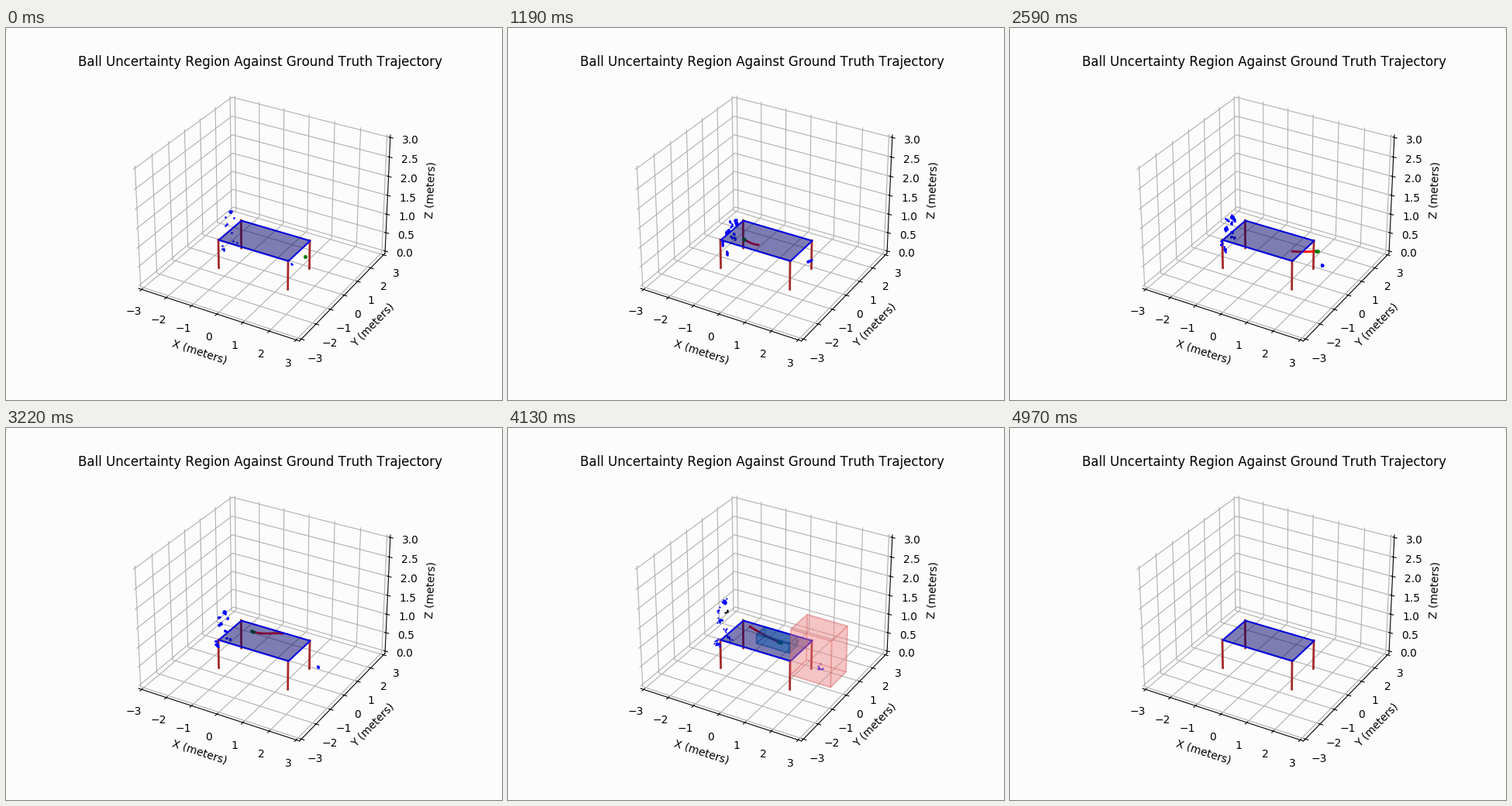
A matplotlib script that plays this animation: 640 by 480 pixels, repeating every 5.04 s.

```python
import itertools
import numpy as np
import matplotlib.pyplot as plt
from matplotlib.animation import FuncAnimation
from matplotlib.lines import Line2D
from matplotlib.transforms import Affine2D
from mpl_toolkits.mplot3d.art3d import Poly3DCollection

W, H = 640, 480
FRAMES, STEP = 72, 70
HIT = 51              # the stroke that starts the predicted regions
TAIL = 5              # samples of history kept on screen
PAPER = "#fcfcfc"

plt.rcParams["text.kerning_factor"] = 6
fig = plt.figure(figsize=(W / 100, H / 100), dpi=100, facecolor=PAPER)
ax = fig.add_subplot(projection="3d", facecolor=PAPER)
pixels = Affine2D().scale(1 / W, -1 / H).translate(0, 1) + fig.transFigure


def add_faces(faces, face, edge, width):
    poly = Poly3DCollection(faces, facecolors=[face], edgecolors=[edge],
                            linewidths=width)
    ax.add_collection3d(poly)
    return poly


def box_faces(lo, hi):
    """Six faces of an axis-aligned box."""
    faces = []
    for axis, side in itertools.product(range(3), (lo, hi)):
        a, b = [k for k in range(3) if k != axis]
        face = []
        for ca, cb in ((lo, lo), (hi, lo), (hi, hi), (lo, hi)):
            point = [0, 0, 0]
            point[axis], point[a], point[b] = side[axis], ca[a], cb[b]
            face.append(tuple(point))
        faces.append(face)
    return faces


def add_line(**style):
    line = Line2D([], [], transform=pixels, **style)
    ax.add_artist(line)
    return line


# Table with legs
LENGTH, WIDTH, HEIGHT = 2.74, 1.525, 0.76
corners = [(sx * LENGTH / 2, sy * WIDTH / 2)
           for sx, sy in ((-1, -1), (1, -1), (1, 1), (-1, 1))]
for x, y in corners:
    ax.plot([x, x], [y, y], [0, HEIGHT], color="brown", lw=2, zorder=1)
add_faces([[(x, y, HEIGHT) for x, y in corners]],
          (0, 0, 0.42, 0.5), (0, 0, 0.88, 1), 1.5)

UNIT = box_faces((0, 0, 0), (1, 1, 1))
reach_box = add_faces(UNIT, (0.94, 0.5, 0.5, 0.25), (0.83, 0.35, 0.35, 0.25), 1.2)
ball_box = add_faces(UNIT, (0, 0.7, 0.95, 0.24), (0, 0.38, 0.58, 0.3), 1.2)
trail = add_line(color="red", lw=2, zorder=2)
ball = add_line(color="green", ls="", marker="o", ms=3.4, mew=0, zorder=2.2)
dots = dict(ls="", marker="o", mew=0, zorder=2.1)
body, shade = add_line(color="blue", **dots), add_line(color="black", **dots)

# Strokes on screen: time, x, y
STROKES = [(0, 386, 295), (21, 292, 262), (37, 397, 288),
           (HIT, 288, 242), (70, 440, 303)]

# Player joints: x, y, shift when leaning forward, number of markers
JOINTS = [(288, 238, 10, 18, 5), (283, 244, 8, 8, 1), (283, 253, 2, 13, 3),
          (291, 264, 4, 3, 1), (295, 275, -3, -6, 2), (278, 283, 1, -4, 2),
          (281, 285, 6, 9, 2), (294, 245, -4, 14, 1)]
marks = np.random.default_rng(4)
OFFSETS = [marks.uniform(-2.5, 2.5, (j[4], 2)) if j[4] > 1 else np.zeros((1, 2))
           for j in JOINTS]


def ball_at(t):
    """Flights to the left rise and dip, flights to the right sag."""
    for (t0, x0, y0), (t1, x1, y1) in zip(STROKES, STROKES[1:]):
        if t <= t1:
            break
    u = (t - t0) / (t1 - t0)
    if x1 < x0:
        u += 0.4 * u * (1 - u)
        bend = -8 * np.sin(2 * np.pi * u)
    else:
        bend = 10 * np.sin(np.pi * u)
    return x0 + u * (x1 - x0), y0 + u * (y1 - y0) + bend


def joint_at(joint, t):
    x, y, dx, dy, _ = joint
    lean = np.sin(np.pi * t / 46) ** 2 if t < 46 else 0
    rise = np.interp(t, [46, 54, 64], [0, 1, 0.5])
    y += lean * dy - 0.7 * rise * max(0, 260 - y) - 0.004 * t * max(0, y - 250)
    return np.array([x + lean * dx - 12 * t / 64, y])


def far_at(t):
    """The marker at the far end of the table."""
    swing = 10 * np.exp(-((t - 22) / 9) ** 2)
    return np.array([368 + 34 * min(1, t / 25), 304.5 + t / 13 - swing])


def markers(n):
    """Marker positions of one sample; the last joint comes last."""
    rng = np.random.default_rng(n)
    points = [far_at(n), far_at(n) + (0.8, 0.5)]
    for joint, offsets in zip(JOINTS, OFFSETS):
        points.extend(joint_at(joint, n) + offsets)
    noise = np.interp(n, [46, 54], [0.3, 1.5])
    return np.array(points) + rng.normal(0, noise, (len(points), 2))


def place_box(box, center, size):
    center, half = np.array(center), np.array(size) / 2
    lo, hi = center - half, center + half
    lo[2] = max(lo[2], 0)
    box.set_verts(box_faces(lo, hi))


ax.set(xlim=(-3.125, 3.125), ylim=(-3.125, 3.125), zlim=(-0.0625, 3.0625),
       xlabel="X (meters)", ylabel="Y (meters)", zlabel="Z (meters)",
       xticks=range(-3, 4), yticks=range(-3, 4),
       zticks=np.arange(0, 3.1, 0.5))
ax.set_title("Ball Uncertainty Region Against Ground Truth Trajectory")
for axis in (ax.xaxis, ax.yaxis, ax.zaxis):
    axis.set_pane_color(PAPER)

moving = (trail, ball, body, shade)


def update(n):
    active = n < FRAMES - 1
    for line in moving:
        line.set_visible(active)
    for box in (reach_box, ball_box):
        box.set_visible(active and n >= HIT)
    if not active:
        return moving

    path = [ball_at(t) for t in np.linspace(max(0, n - TAIL), n, 21)]
    trail.set_data(*zip(*path))
    ball.set_data(*zip(ball_at(max(0, n - 0.35)), ball_at(n)))

    samples = [markers(k) for k in range(max(0, n - TAIL + 1), n + 1)]
    dark = 1 if n > HIT else 0
    split = len(samples[0]) - dark
    for line, part in ((body, slice(None, split)), (shade, slice(split, None))):
        points = np.concatenate([s[part] for s in samples])
        line.set_data(points[:, 0], points[:, 1])
        line.set_markersize(np.interp(n, [46, 54], [1.9, 1.6]))

    # Both regions grow steadily after the stroke
    k = n - 54
    depth = 1.1 + 0.088 * k
    place_box(reach_box, (1.23 + depth / 2, 0.09, 0.85),
              (depth, 0.65 + 0.095 * k, 0.71 + 0.099 * k))
    place_box(ball_box, (-0.9 + 0.272 * k, 0.385 - 0.0885 * k, 0.87 + 0.001 * k),
              (0.85 + 0.085 * k, 0.33 + 0.05 * k, 0.17 + 0.013 * k))
    return moving


anim = FuncAnimation(fig, update, frames=FRAMES, interval=STEP, repeat=True)
plt.show()
```
